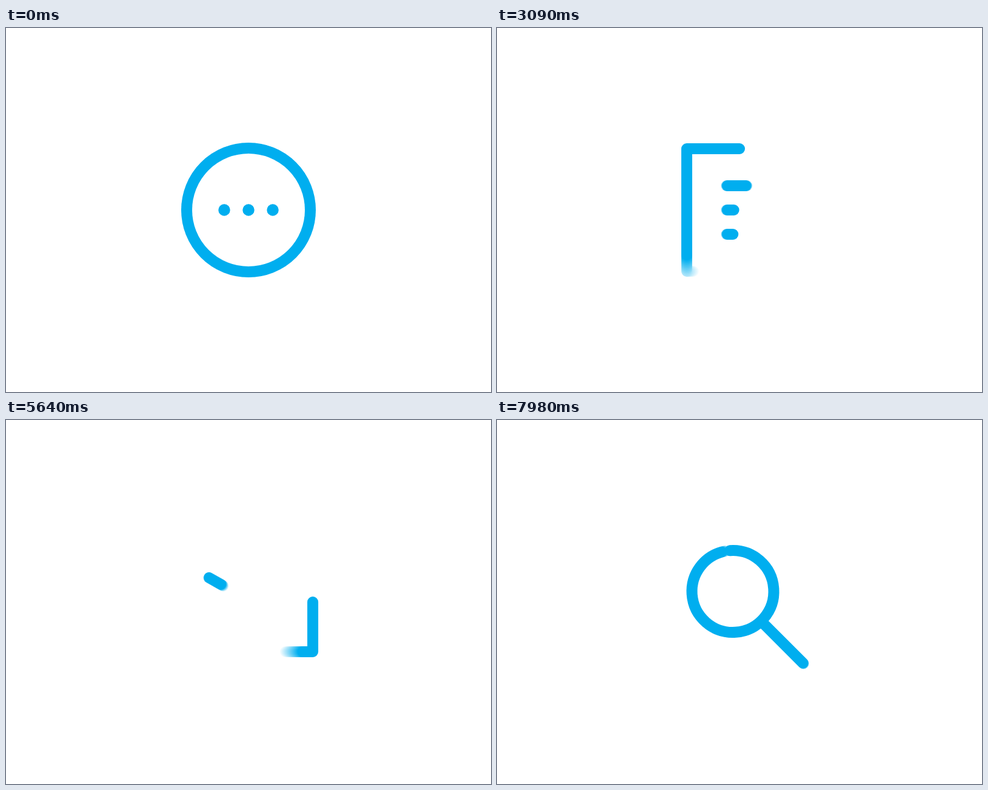
Write an HTML page with a canvas that moves like this. It is 800 px wide and 600 px high and loops after 8000 ms.

```html
<!DOCTYPE html>
<html lang="en">
<head>
<meta charset="utf-8">
<title>Icon loop</title>
<style>
  html, body { margin: 0; width: 100%; height: 100%; overflow: hidden; background: #fff; }
  canvas { display: block; width: 800px; height: 600px; }
</style>
</head>
<body>
<canvas id="stage" width="800" height="600"></canvas>
<script>
const ctx = document.getElementById('stage').getContext('2d');
const LOOP = 8000, STEP = 30, SHUTTER = 15, SAMPLES = 15;
const COLOR = '#00aeef';
const TRIM = 410; // time for an outline to run out or in

const clamp = v => Math.max(0, Math.min(1, v));
const lerp = (a, b, p) => a + (b - a) * p;
const smooth = (t, start, length = TRIM) => {
  const p = clamp((t - start) / length);
  return p * p * (3 - 2 * p);
};
const settle = (t, start, tau) => t < start ? 0 : 1 - Math.exp((start - t) / tau);

// Strokes the current path between the fractions a and b of its length.
function strokePart(length, a, b) {
  if (b - a < 0.0005) return;
  const whole = a === 0 && b === 1;
  ctx.setLineDash(whole ? [] : [length * (b - a), length * 2]);
  ctx.lineDashOffset = -length * a;
  ctx.stroke();
}

function polyline(points, a = 0, b = 1) {
  let length = 0;
  ctx.beginPath();
  points.forEach(([x, y], i) => {
    if (i) length += Math.hypot(x - points[i - 1][0], y - points[i - 1][1]);
    ctx.lineTo(x, y);
  });
  strokePart(length, a, b);
}

function ring(x, y, r, a, b, startAngle = -Math.PI / 2) {
  ctx.beginPath();
  ctx.arc(x, y, r, startAngle, startAngle + 2 * Math.PI);
  strokePart(2 * Math.PI * r, a, b);
}

function dot(x, y, r = 9) {
  ctx.beginPath();
  ctx.arc(x, y, r, 0, 2 * Math.PI);
  ctx.fill();
}

function chat(t) {
  const out = smooth(t, 750);
  ring(400, 300, lerp(102, 101, out), out, 1);
  const turn = smooth(t, 750, 390);
  const angle = Math.PI * (1 + turn / 2);
  for (const d of [-40, 0, 40]) {
    dot(400 - d * Math.cos(angle), 300 - d * Math.sin(angle), lerp(9.7, 9, turn));
  }
}

function page(t) {
  polyline([[400, 199], [487, 199], [487, 401], [313, 401], [313, 199], [400, 199]],
    smooth(t, 2850), smooth(t, 1160));
}

function textLines(t) {
  const grow = settle(t, 1150, 190);
  const shrink = smooth(t, 2850, 400);
  const left = lerp(lerp(400, 351, grow), 394.5, shrink);
  const merge = smooth(t, 3250, 300);
  [[91, 1], [54, 1.5], [50, 1.55]].forEach(([length, power], i) => {
    const y = lerp(260 + 40 * i, i ? 310 : 258, merge);
    const right = left + length * grow * (1 - shrink) ** power;
    polyline([[left, y], [right + 0.1, y]]);
  });
}

function clock(t) {
  const radius = 101 + settle(t, 3260, 170);
  const turn = smooth(t, 4950, 250) * Math.PI / 2;
  ring(400, 300, radius, smooth(t, 5130), smooth(t, 3260), turn - Math.PI / 2);
  polyline([[395, 258], [395, 310], [430, 310]],
    smooth(t, 4950, 590), smooth(t, 3250));
}

function envelope(t) {
  const drawn = smooth(t, 5540), gone = smooth(t, 7200);
  const open = settle(t, 5540, 90);
  const l = lerp(298, 292, open), r = lerp(502, 508, open);
  polyline([[r, 300], [r, 382], [l, 382], [l, 218], [r, 218], [r, 300]], gone, drawn);
  const shift = 21 * (1 - open);
  polyline([[328 + shift, 260], [399 + shift, 300], [470 + shift, 260]], gone, drawn);
}

function magnifier(t) {
  const drawn = smooth(t, 7610);
  ring(389, 282.5, 67.5, 0, drawn, -94 * Math.PI / 180);
  polyline([[437, 333], [507, 403]], 0, drawn);
}

function scene(t) {
  if (t < 1150) chat(t);
  if (t >= 1150 && t < 3550) textLines(t);
  if (t >= 1160 && t < 3260) page(t);
  if (t >= 3250 && t < 5540) clock(t);
  if (t >= 5540 && t < 7610) envelope(t);
  if (t >= 7610) magnifier(t);
}

// Averages several moments within the shutter time, then tints the result.
function render(time) {
  const t = Math.floor(time / STEP) * STEP;
  ctx.globalCompositeOperation = 'source-over';
  ctx.clearRect(0, 0, 800, 600);
  ctx.globalCompositeOperation = 'lighter';
  for (let i = 0; i < SAMPLES; i++) {
    // A layer must not cover itself twice, so the alpha goes through a mask.
    mask(t + ((i + 0.5) / SAMPLES - 0.5) * SHUTTER);
    ctx.globalAlpha = 1 / SAMPLES;
    ctx.drawImage(layer, 0, 0);
    ctx.globalAlpha = 1;
  }
  ctx.globalCompositeOperation = 'source-in';
  ctx.fillStyle = COLOR;
  ctx.fillRect(0, 0, 800, 600);
}

const layer = document.createElement('canvas');
layer.width = 800;
layer.height = 600;
const layerCtx = layer.getContext('2d');
layerCtx.lineWidth = 18;
layerCtx.lineCap = layerCtx.lineJoin = 'round';

function mask(t) {
  layerCtx.clearRect(0, 0, 800, 600);
  withContext(layerCtx, () => scene(t));
}

// Shape helpers draw on whichever context is passed here.
function withContext(target, draw) {
  const names = ['beginPath', 'arc', 'lineTo', 'stroke', 'fill', 'setLineDash'];
  const saved = names.map(name => ctx[name]);
  names.forEach(name => { ctx[name] = target[name].bind(target); });
  Object.defineProperty(ctx, 'lineDashOffset', {
    configurable: true, set: v => { target.lineDashOffset = v; }
  });
  draw();
  names.forEach((name, i) => { ctx[name] = saved[i]; });
  delete ctx.lineDashOffset;
}

const begin = performance.now();
function tick() {
  render((performance.now() - begin) % LOOP);
  requestAnimationFrame(tick);
}
tick();
</script>
</body>
</html>
```
